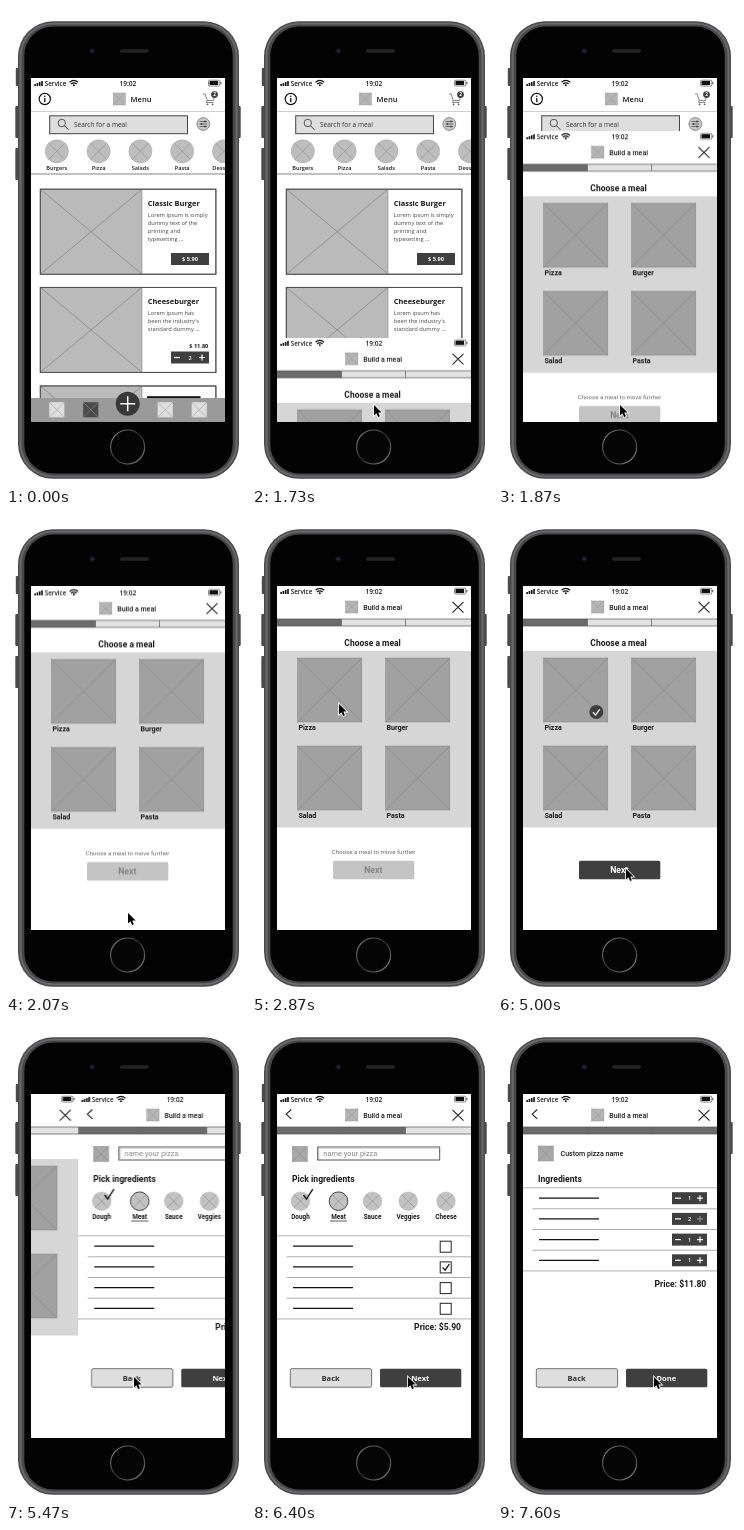
Recreate the animation shown at these times as an HTML page. Size 240x480 px, loop 8000 ms.

```html
<!DOCTYPE html>
<html lang="en">
<head>
<meta charset="utf-8">
<title>Meal builder</title>
<style>
html, body { margin: 0; width: 100%; height: 100%; overflow: hidden; background: #fff; }
svg { display: block; width: 100vw; height: 100vh; }
text { font-family: "Open Sans", sans-serif; }
.ro { font-family: Roboto, sans-serif; }
.sheet, .pager, .cursor, .before, .after { animation: 8s linear infinite; }
.sheet { animation-name: rise; }
.pager { animation-name: push; }
.cursor { animation-name: point; }
.before { animation-name: leave; animation-timing-function: step-end; }
.after { animation-name: enter; animation-timing-function: step-end; }
@keyframes rise {
  0% { transform: translateY(344px); }
  19.77% { transform: translateY(344px); animation-timing-function: cubic-bezier(.5, 0, .1, 1); }
  26.52%, 100% { transform: none; }
}
@keyframes push {
  0% { transform: translateX(0); }
  66.25% { transform: translateX(0); animation-timing-function: ease-out; }
  70% { transform: translateX(-194px); }
  91.25% { transform: translateX(-194px); animation-timing-function: ease-out; }
  95%, 100% { transform: translateX(-388px); }
}
@keyframes leave { 0% { opacity: 1; } 43.3%, 100% { opacity: 0; } }
@keyframes enter { 0% { opacity: 0; } 43.3%, 100% { opacity: 1; } }
@keyframes point {
  0% { transform: translate(11px, 482px); }
  6.3% { transform: translate(11px, 482px); animation-timing-function: ease-in-out; }
  15.9% { transform: translate(122px, 399px); }
  31.3% { transform: translate(122px, 399px); animation-timing-function: ease-in-out; }
  35.9% { transform: translate(87px, 190px); }
  48.7% { transform: translate(87px, 190px); animation-timing-function: ease-in-out; }
  55.9% { transform: translate(125px, 362px); }
  58.7% { transform: translate(125px, 362px); animation-timing-function: ease-in-out; }
  62.5% { transform: translate(128px, 355px); }
  76.8% { transform: translate(128px, 355px); animation-timing-function: ease-in-out; }
  80%, 100% { transform: translate(156px, 355px); }
}
</style>
</head>
<body>
<svg id="stage" viewBox="0 0 240 480"></svg>
<script>
const DARK = '#3f3f3f';

const rect = (x, y, w, h, fill, extra = '') =>
  `<rect x="${x}" y="${y}" width="${w}" height="${h}" fill="${fill}" ${extra}/>`;
const circle = (x, y, r, fill, extra = '') =>
  `<circle cx="${x}" cy="${y}" r="${r}" fill="${fill}" ${extra}/>`;
const path = (d, color = '#111', width = 1) =>
  `<path d="${d}" fill="none" stroke="${color}" stroke-width="${width}"/>`;
const text = (x, y, size, str, { weight = 400, fill = '#1a1a1a', anchor = 'start', font = '' } = {}) =>
  `<text x="${x}" y="${y}" font-size="${size}" font-weight="${weight}" fill="${fill}" text-anchor="${anchor}" class="${font}">${str}</text>`;
const roboto = (x, y, size, str, opts = {}) =>
  text(x, y, size, str, { weight: 600, font: 'ro', ...opts });
const group = (content, attrs = '') => `<g ${attrs}>${content}</g>`;

const picture = (x, y, w, h, fill, line) =>
  rect(x, y, w, h, fill, `stroke="${line}" stroke-width=".5"`) +
  path(`M${x} ${y}l${w} ${h}m0 ${-h}l${-w} ${h}`, line, .6);
const disc = (x, y, r, fill, ring = '#aaa', ringWidth = .5) => {
  const d = r * .7;
  return circle(x, y, r, fill, `stroke="${ring}" stroke-width="${ringWidth}"`) +
    path(`M${x - d} ${y - d}l${2 * d} ${2 * d}m0 ${-2 * d}l${-2 * d} ${2 * d}`, '#8c8c8c', .6);
};
const button = (x, label, { fill = DARK, color = '#fff', border = 'none', font = '', size = 7.6 } = {}) =>
  rect(x, 346.7, 81.3, 18.5, fill, `rx="1.5" stroke="${border}" stroke-width=".9"`) +
  text(x + 40.3, 358.7, size, label, { weight: 700, fill: color, anchor: 'middle', font });
const stepper = (x, y, w, count, plus = '#fff') =>
  rect(x, y, w, 12, DARK) +
  path(`M${x + 3} ${y + 6}h6`, '#fff', 1.2) +
  path(`M${x + w - 10} ${y + 6}h6m-3 -3v6`, plus, 1.2) +
  text(x + w / 2, y + 8.1, 5.6, count, { weight: 600, fill: '#fff', anchor: 'middle' });

const statusBar = () =>
  [0, 1, 2, 3].map(i => rect(28.3 + i * 2.3, 78 - i, 1.6, 2 + i, '#111')).join('') +
  text(38.7, 79.6, 6.3, 'Service', { weight: 600 }) +
  path('M63.5 76.2q4.3 -3.6 8.6 0M65 78q2.8 -2.2 5.6 0', '#111', 1.2) +
  circle(67.8, 79.3, 1, '#111') +
  text(121.9, 79.6, 6.6, '19:02', { weight: 600, anchor: 'middle' }) +
  rect(202.5, 74.2, 11.3, 5.8, '#fff', 'rx="1.3" stroke="#333" stroke-width=".6"') +
  rect(203.5, 75.1, 8.6, 4, '#111', 'rx=".6"') + rect(214.4, 76, .9, 2.2, '#333');

const paper = () => rect(25, 72, 194, 344, '#fff') + statusBar();

function card(y, title, lines) {
  const frame = fill => rect(34.3, y, 175.6, 85, fill, 'stroke="#4a4a4a" stroke-width=".9"');
  return frame('#fff') +
    picture(34.3, y, 101.7, 85, '#bababa', '#777') + frame('none') +
    text(141.7, y + 16.7, 7.45, title, { weight: 700 }) +
    lines.map((s, i) => text(141.7, y + 28 + i * 7.8, 5.75, s, { fill: '#444' })).join('');
}

function menuScreen() {
  const categories = ['Burgers', 'Pizza', 'Salads', 'Pasta', 'Desserts'].map((name, i) => {
    const x = 50.8 + i * 41.8;
    return disc(x, 145.3, 11.6, '#bdbdbd') +
      text(x, 164, 5.6, name, { weight: 600, anchor: 'middle' });
  }).join('');
  const tabs = [43, 77, 151.5, 185.5].map((x, i) =>
    picture(x, 396, 15.5, 15.5, i === 1 ? '#4a4a4a' : '#dedede', i === 1 ? '#8c8c8c' : '#a5a5a5')).join('');
  return paper() +
    circle(38.8, 93, 5.6, '#fff', 'stroke="#111" stroke-width="1.2"') +
    path('M38.8 92v4.2', '#111', 1.3) + circle(38.8, 90.2, .8, '#111') +
    picture(107.3, 87, 12, 12, '#b5b5b5', '#999') +
    text(124.6, 96, 7.6, 'Menu', { weight: 600 }) +
    path('M197 88h2.2l2 6.5h6.2l1 -4M201.2 94.5l-.6 2h7', '#666', .8) +
    circle(201.6, 98.3, .9, '#555') + circle(206.6, 98.3, .9, '#555') +
    circle(208.5, 88.6, 3.4, DARK) +
    text(208.5, 90.4, 4.8, '2', { weight: 700, fill: '#fff', anchor: 'middle' }) +
    path('M25 105.5h194', '#bbb', .7) +
    rect(43.7, 109.8, 137.8, 17.9, '#dedede', 'stroke="#444" stroke-width="1"') +
    circle(55.8, 117, 3.7, 'none', 'stroke="#444" stroke-width=".9"') +
    path('M58.4 119.7l4 4', '#444', 1) +
    text(68, 121, 6.5, 'Search for a meal', { fill: '#333' }) +
    circle(197.3, 118, 6.4, '#c8c8c8', 'stroke="#777" stroke-width=".8"') +
    path('M193.5 115.5h7.6m-7.6 2.5h7.6m-7.6 2.5h7.6', '#555', .8) +
    circle(199, 115.5, .9, '#444') + circle(195.5, 118, .9, '#444') + circle(199, 120.5, .9, '#444') +
    categories +
    path('M25 168h194', '#777', .9) +
    card(183.2, 'Classic Burger', ['Lorem ipsum is simply', 'dummy text of the', 'printing and', 'typesetting ...']) +
    rect(165, 247, 38, 12, DARK) +
    text(184, 255.1, 5.65, '$ 5.90', { weight: 700, fill: '#fff', anchor: 'middle' }) +
    card(281.4, 'Cheeseburger', ['Lorem ipsum has', "been the industry's", 'standard dummy ...']) +
    text(202.3, 341.5, 5.6, '$ 11.80', { weight: 700, anchor: 'end' }) +
    stepper(165, 345.5, 38, 2) +
    card(380, '', []) + rect(141, 390.2, 53.5, 2, '#111') +
    rect(25, 392, 194, 24, '#9a9a9a') + tabs +
    circle(121.7, 397.8, 12, '#383838') +
    path('M114.2 397.8h15m-7.5 -7.5v15', '#fff', 1.5);
}

function wizardHead(done) {
  const edges = [25, 89.5, 153.5, 219];
  const cells = [0, 1, 2].map(i =>
    rect(edges[i], 105, edges[i + 1] - edges[i], 7, i < done ? '#6b6b6b' : '#e2e2e2')).join('');
  return paper() +
    picture(93.6, 87, 12.3, 12, '#b5b5b5', '#999') +
    roboto(111.2, 95.6, 7.05, 'Build a meal', { weight: 500 }) +
    path('M200.5 87.8l11 10.8m0 -10.8l-11 10.8', '#222', 1.1) +
    (done > 1 ? path('M39.2 87.5l-5 4.7l5 4.7', '#222', 1.1) : '') +
    cells + path('M25 105h194M25 112h194M89.5 105v7M153.5 105v7', '#555', .7);
}

function chooseStep() {
  const meals = ['Pizza', 'Burger', 'Salad', 'Pasta'].map((name, i) => {
    const x = 45.5 + (i % 2) * 88, y = 144 + (i >> 1) * 88;
    return picture(x, y, 64.3, 64, '#a1a1a1', '#858585') + roboto(x + .9, y + 72.4, 7.1, name);
  }).join('');
  const idle = roboto(121.5, 340, 6.1, 'Choose a meal to move further', { weight: 400, fill: '#666', anchor: 'middle' }) +
    button(81, 'Next', { fill: '#c4c4c4', color: '#858585', font: 'ro', size: 8.7 });
  const ready = circle(98.3, 198, 7, DARK) + path('M95 198.2l2.5 2.8l4.2 -5.7', '#fff', 1.2) +
    button(81, 'Next', { font: 'ro', size: 8.7 });
  return wizardHead(1) +
    roboto(120.6, 131.6, 8.5, 'Choose a meal', { anchor: 'middle' }) +
    rect(25, 137, 194, 176.5, '#d6d6d6') + meals +
    group(idle, 'class="before"') + group(ready, 'class="after"');
}

const backButton = () => button(38.3, 'Back', { fill: '#dedede', color: '#333', border: '#666' });

// Four placeholder rows; control(y, i) draws the right-hand part.
function rows(top, control) {
  const list = [0, 1, 2, 3].map(i => {
    const y = top + i * 20.7;
    return path(`M41 ${y}h60`, '#111', 1.2) +
      path(`M${i < 3 ? 34.5 : 25} ${y + 10.6}H219`, '#999', .8) + control(y, i);
  }).join('');
  return path(`M25 ${top - 10.4}h194`, '#999', .7) + list;
}

function ingredientStep() {
  const kinds = ['Dough', 'Meat', 'Sauce', 'Veggies', 'Cheese'].map((name, i) => {
    const x = [48.5, 86.5, 120.5, 156.2, 194][i], active = i === 1;
    return disc(x, 179.2, 9.3, '#c2c2c2', active ? '#444' : '#b5b5b5', active ? 1 : .5) +
      roboto(x, 196.8, 6.4, name, { anchor: 'middle' });
  }).join('');
  const checkbox = (y, i) =>
    rect(188.2, y - 5, 11, 11, '#fff', 'stroke="#222" stroke-width="1"') +
    (i === 1 ? path(`M190.5 ${y + .5}l2.6 2.8l4.2 -6`, '#111', 1.2) : '');
  return wizardHead(2) +
    picture(40.3, 124.5, 15, 15, '#a8a8a8', '#8a8a8a') +
    rect(65.7, 125, 122, 13, '#fff', 'stroke="#555" stroke-width="1"') +
    path('M66.7 137v-11h120', '#bbb', 1) +
    roboto(71.3, 134.2, 7.45, 'name your pizza', { weight: 400, fill: '#888' }) +
    roboto(40, 159.7, 8.6, 'Pick ingredients') + kinds +
    path('M78 199h17', '#333', .8) +
    path('M51.5 173l3 4.2l6.3 -10', '#111', 1.3) +
    rows(224.2, checkbox) +
    roboto(209, 308, 8.6, 'Price: $5.90', { anchor: 'end' }) +
    backButton() + button(128, 'Next');
}

function reviewStep() {
  const counts = (y, i) => stepper(174, y - 6, 35, i === 1 ? 2 : 1, i === 1 ? '#8a8a8a' : '#fff');
  return wizardHead(3) +
    picture(40.3, 124, 15, 15, '#a8a8a8', '#8a8a8a') +
    roboto(62.5, 134, 7.1, 'Custom pizza name', { weight: 500 }) +
    roboto(40, 159.5, 8.6, 'Ingredients') +
    rows(176.2, counts) +
    roboto(208.3, 264.5, 8.6, 'Price: $11.80', { anchor: 'end' }) +
    backButton() + button(128, 'Done');
}

const phone = () =>
  rect(9.8, 62, 4, 18, '#4a4a4c', 'rx="1"') + rect(9.3, 100, 4, 32, '#4a4a4c', 'rx="1"') +
  rect(9.3, 142, 4, 32, '#4a4a4c', 'rx="1"') + rect(230.7, 100, 4, 32, '#4a4a4c', 'rx="1"') +
  rect(12, 15.3, 221, 457.5, '#4b4b4d', 'rx="35"') +
  rect(13.5, 16.8, 218, 454.5, '#6a6a6c', 'rx="33.5"') +
  rect(15.5, 18.5, 214, 451, '#48484a', 'rx="31.5"') +
  rect(18.3, 20.5, 208.4, 447, '#030303', 'rx="29"') +
  circle(86.3, 45, 2.8, '#14141f') + circle(86.3, 45, 1.2, '#262a4a') +
  rect(114, 43.3, 29, 3.4, '#242426', 'rx="1.7"') +
  circle(121.6, 441, 17, '#050505', 'stroke="url(#ring)" stroke-width="1.2"');

const pages = [chooseStep, ingredientStep, reviewStep]
  .map((page, i) => group(
    `<svg x="25" y="72" width="194" height="344" viewBox="25 72 194 344">${page()}</svg>`,
    `transform="translate(${i * 194})"`)).join('');

document.getElementById('stage').innerHTML =
  `<defs>
    <clipPath id="screen"><rect x="25" y="72" width="194" height="344"/></clipPath>
    <linearGradient id="ring" x2="1" y2="1">
      <stop offset=".1" stop-color="#777"/><stop offset=".5" stop-color="#2a2a2a"/><stop offset=".9" stop-color="#777"/>
    </linearGradient>
  </defs>` +
  phone() +
  group(menuScreen() + group(group(pages, 'class="pager"'), 'class="sheet"'), 'clip-path="url(#screen)"') +
  group('<path d="M0 0V10.5L2.4 8.3L4.1 12L5.9 11.2L4.3 7.6H7.6Z" fill="#000" stroke="#fff" stroke-width="1.6" paint-order="stroke"/>', 'class="cursor"');
</script>
</body>
</html>
```
